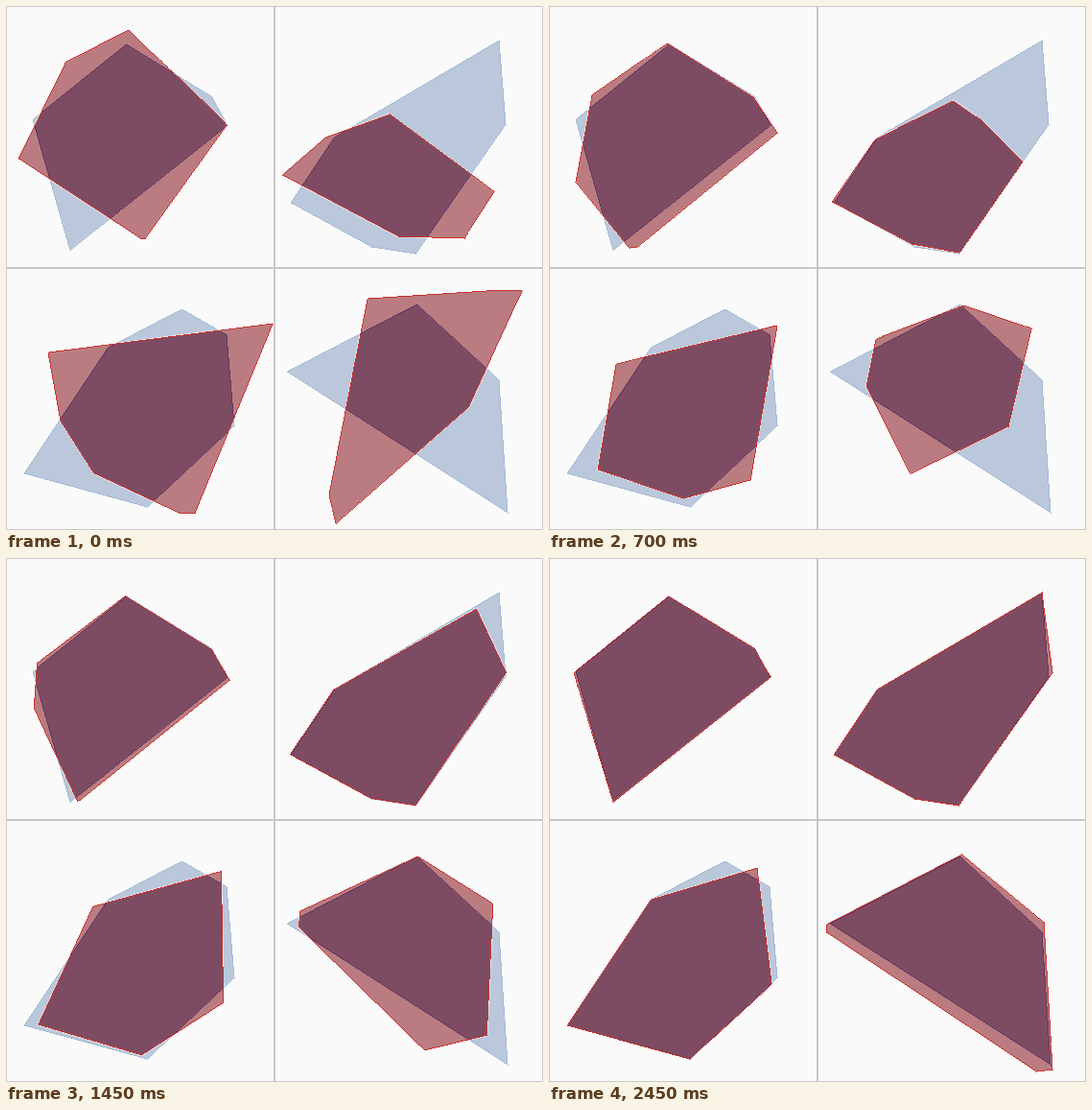
Write an HTML page with a canvas that moves like this. It is 560x546 px and loops after 2500 ms.

```html
<!DOCTYPE html>
<html lang="en">
<head>
<meta charset="utf-8">
<title>Convex shape fitting</title>
<style>
  html, body { margin: 0; width: 100%; height: 100%; overflow: hidden; background: #fafafa; }
  canvas { display: block; }
</style>
</head>
<body>
<canvas id="stage" width="560" height="546"></canvas>
<script>
const ctx = document.getElementById('stage').getContext('2d');
const LOOP = 2500, STEP = 50;
const TURN = 700, REST = 2450;
const CELL_W = 280, CELL_H = 273;

// "x,y x,y" to a list of corners
const corners = text => text.split(' ').map(pair => pair.split(',').map(Number));

// Each cell fits a convex shape to its goal. Poses list the corners clockwise;
// a repeated corner is an edge that has shrunk to nothing.
function topLeft() {
  const goal = corners('125,40 215,95 231,124 67,254 28,118');
  const [top, right, tip, bottom] = goal;
  return { goal, power: 1.8, poses: [
    { at: 0, points: corners('128,25 228,121 230,124 145,242 140,242 13,159 62,59') },
    { at: TURN, points: corners('123,39 214,96 238,132 92,251 84,252 28,183 45,93') },
    { at: REST, points: [top, right, tip, bottom, bottom, [26.5, 122], [26.5, 119]] }
  ] };
}

function topRight() {
  const goal = corners('514,36 521,123 427,258 381,251 297,205 342,137');
  const [top, , ...base] = goal;
  const reach = [509, 39];
  return { goal, power: 1, poses: [
    { at: 0, points: corners('400,113 507,192 509,194 478,242 409,240 288,176 333,137') },
    { at: TURN, points: corners('422,99 452,120 494,162 428,257 378,248 295,204 340,139') },
    { at: 1650, points: [reach, reach, [532, 103], ...base] },
    { at: REST, points: [top, top, [525, 120], ...base] }
  ] };
}

function bottomLeft() {
  const goal = corners('183,316 230,343 238,437 147,522 19,487 106,356');
  const [, , , bottom, left, shoulder] = goal;
  return { goal, power: 1.8, poses: [
    { at: 0, points: corners('278,331 197,528 180,528 92,487 57,432 44,361') },
    { at: TURN, points: corners('238,333 210,494 141,513 51,483 51,483 70,373') },
    { at: REST, points: [[217, 323], [232, 444], bottom, left, left, shoulder] }
  ] };
}

function bottomRight() {
  const goal = corners('428,311 514,390 523,528 293,381');
  return { goal, power: 1.8, poses: [
    { at: 0, points: corners('516,296 538,297 483,417 344,539 337,510 377,305') },
    { at: TURN, points: corners('433,312 503,336 479,438 377,487 331,396 341,347') },
    { at: REST, points: corners('430,309 516,380 525,533 508,535 289,390 289,382') }
  ] };
}

// Edges as half-planes: direction angle and distance from the cell centre.
// An edge without length keeps the angle it had before.
function toPlanes(points, before, cx, cy) {
  return points.map(([x, y], i) => {
    const [x2, y2] = points[(i + 1) % points.length];
    const gone = x === x2 && y === y2;
    const angle = gone ? before[i].angle : Math.atan2(y2 - y, x2 - x);
    return { angle, dist: Math.sin(angle) * (x - cx) - Math.cos(angle) * (y - cy) };
  });
}

function makeCell({ goal, power, poses }, index) {
  const x = (index % 2) * CELL_W, y = Math.floor(index / 2) * CELL_H;
  const cx = x + CELL_W / 2, cy = y + CELL_H / 2;
  let planes;
  const keys = poses.map(({ at, points }) => ({ at, planes: planes = toPlanes(points, planes, cx, cy) }));
  return { x, y, cx, cy, goal, power, keys };
}

const cells = [topLeft(), topRight(), bottomLeft(), bottomRight()].map(makeCell);

// Part of the polygon on the inner side of a half-plane
function cut(points, { angle, dist }, cx, cy) {
  const nx = Math.sin(angle), ny = -Math.cos(angle);
  const side = ([x, y]) => nx * (x - cx) + ny * (y - cy) - dist;
  const kept = [];
  points.forEach((p, i) => {
    const q = points[(i + 1) % points.length];
    const a = side(p), b = side(q);
    if (a <= 0) kept.push(p);
    if (a * b < 0) {
      const s = a / (a - b);
      kept.push([p[0] + (q[0] - p[0]) * s, p[1] + (q[1] - p[1]) * s]);
    }
  });
  return kept;
}

// Edges turn steadily at first, then slow down as they settle on the goal.
function fittedShape({ keys, power, cx, cy }, t) {
  let k = 0;
  while (k < keys.length - 2 && t >= keys[k + 1].at) k++;
  const from = keys[k], to = keys[k + 1];
  const u = (t - from.at) / (to.at - from.at);
  const s = k === 0 ? u : 1 - (1 - u) ** power;
  let points = [[-900, -900], [1500, -900], [1500, 1500], [-900, 1500]];
  from.planes.forEach((a, i) => {
    const b = to.planes[i];
    const turn = b.angle - a.angle;
    const shortest = Math.atan2(Math.sin(turn), Math.cos(turn));
    const plane = { angle: a.angle + shortest * s, dist: a.dist + (b.dist - a.dist) * s };
    points = cut(points, plane, cx, cy);
  });
  return points;
}

function outline(points) {
  const path = new Path2D();
  points.forEach(([x, y]) => path.lineTo(x, y));
  path.closePath();
  return path;
}

function fill(path, color) {
  ctx.fillStyle = color;
  ctx.fill(path);
}

// Hard-edged outline, one pixel wide
function pixelOutline(points, color) {
  ctx.fillStyle = color;
  points.forEach(([x, y], i) => {
    const [x2, y2] = points[(i + 1) % points.length];
    const steps = Math.max(1, Math.round(Math.max(Math.abs(x2 - x), Math.abs(y2 - y))));
    for (let n = 0; n <= steps; n++) {
      const s = n / steps;
      ctx.fillRect(Math.round(x + (x2 - x) * s - 0.5), Math.round(y + (y2 - y) * s - 0.5), 1, 1);
    }
  });
}

function within(path, draw) {
  ctx.save();
  ctx.clip(path);
  draw();
  ctx.restore();
}

function drawCell(cell, t) {
  const shape = fittedShape(cell, t);
  const goal = outline(cell.goal), fit = outline(shape);
  fill(goal, '#bbc8db');
  pixelOutline(cell.goal, '#a3b9d4');
  within(goal, () => {
    ctx.strokeStyle = '#f3edf0';
    ctx.lineWidth = 2;
    ctx.stroke(fit);
  });
  fill(fit, '#ba7c80');
  within(goal, () => fill(fit, '#7d4c62'));
  within(fit, () => pixelOutline(cell.goal, '#5e3560'));
  pixelOutline(shape, '#c8322f');
  ctx.strokeStyle = '#c8c8c8';
  ctx.lineWidth = 1;
  ctx.strokeRect(cell.x + 0.5, cell.y + 0.5, CELL_W - 1, CELL_H - 1);
}

function render(now) {
  const t = Math.floor((now % LOOP) / STEP) * STEP;
  ctx.fillStyle = '#fafafa';
  ctx.fillRect(0, 0, 560, 546);
  cells.forEach(cell => drawCell(cell, t));
}

const start = performance.now();
function tick() {
  render(performance.now() - start);
  requestAnimationFrame(tick);
}
tick();
</script>
</body>
</html>
```
